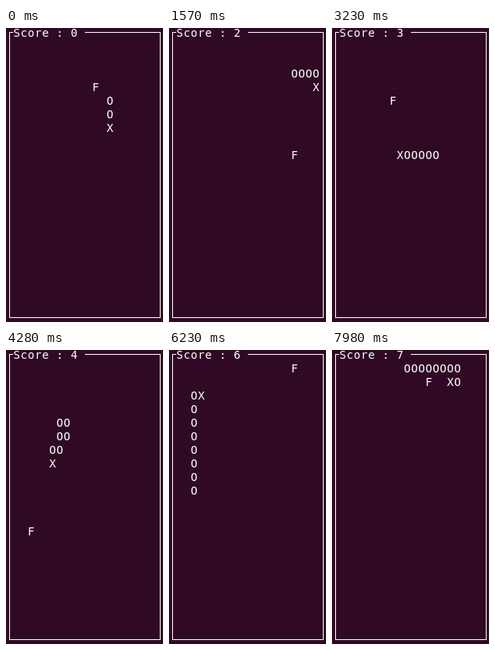
Write an HTML page with a canvas that moves like this. It is 197 px wide and 368 px high and loops after 8000 ms.

```html
<!DOCTYPE html>
<html lang="en">
<head>
<meta charset="utf-8">
<title>Snake</title>
<style>
  html, body { margin: 0; width: 100%; height: 100%; overflow: hidden; background: #300a24; }
  canvas { display: block; }
</style>
</head>
<body>
<canvas id="stage" width="197" height="368"></canvas>
<script>
const ctx = document.getElementById('stage').getContext('2d');
const LOOP = 8000, FIRST_MOVE = 122, MOVE_TIME = 103.38;
const CELL_W = 9, CELL_H = 17, BASELINE = 11;

// The head's route from the first tail cell: direction and length of each run.
// A * marks the place where the head eats.
const START = { col: 14, row: 5 };
const ROUTE = 'D2 L2 U3* U1 R8* D6 L3* L9 U4* L1 D2 L1 D6 L3* U10 R1* R3 U2 R10* D1 L1';
const LAST_FOOD = { col: 13, row: 2 };
const DIRECTIONS = { U: [0, -1], D: [0, 1], L: [-1, 0], R: [1, 0] };

const path = [START], meals = [];
for (const [, direction, length, eats] of ROUTE.matchAll(/([UDLR])(\d+)(\*?)/g)) {
  const [dx, dy] = DIRECTIONS[direction];
  for (let n = 0; n < length; n++) {
    const { col, row } = path[path.length - 1];
    path.push({ col: col + dx, row: row + dy });
  }
  if (eats) meals.push(path.length - 1);
}

function put(text, { col, row }) {
  [...text].forEach((char, i) =>
    ctx.fillText(char, (col + i + 0.5) * CELL_W, row * CELL_H + BASELINE));
}

function drawBorder() {
  ctx.fillRect(4, 5, 5, 1);
  ctx.fillRect(99, 5, 95, 1);
  ctx.fillRect(4, 362, 190, 1);
  ctx.fillRect(4, 5, 1, 358);
  ctx.fillRect(193, 5, 1, 358);
}

function draw(ms) {
  const moves = Math.max(0, Math.floor((ms - FIRST_MOVE) / MOVE_TIME) + 1);
  const head = Math.min(moves + 2, path.length - 1);
  const score = meals.filter(meal => meal <= head).length;
  const food = score < meals.length ? path[meals[score]] : LAST_FOOD;

  ctx.fillStyle = '#300a24';
  ctx.fillRect(0, 0, 197, 368);
  ctx.fillStyle = '#fff';
  ctx.font = '14px "DejaVu Sans Mono", monospace';
  ctx.textAlign = 'center';
  drawBorder();
  put('Score : ' + score, { col: 1, row: 0 });
  put('F', food);
  path.slice(head - score - 2, head).forEach(cell => put('O', cell));
  put('X', path[head]);
}

function tick() {
  draw(performance.now() % LOOP);
  requestAnimationFrame(tick);
}
tick();
</script>
</body>
</html>
```
